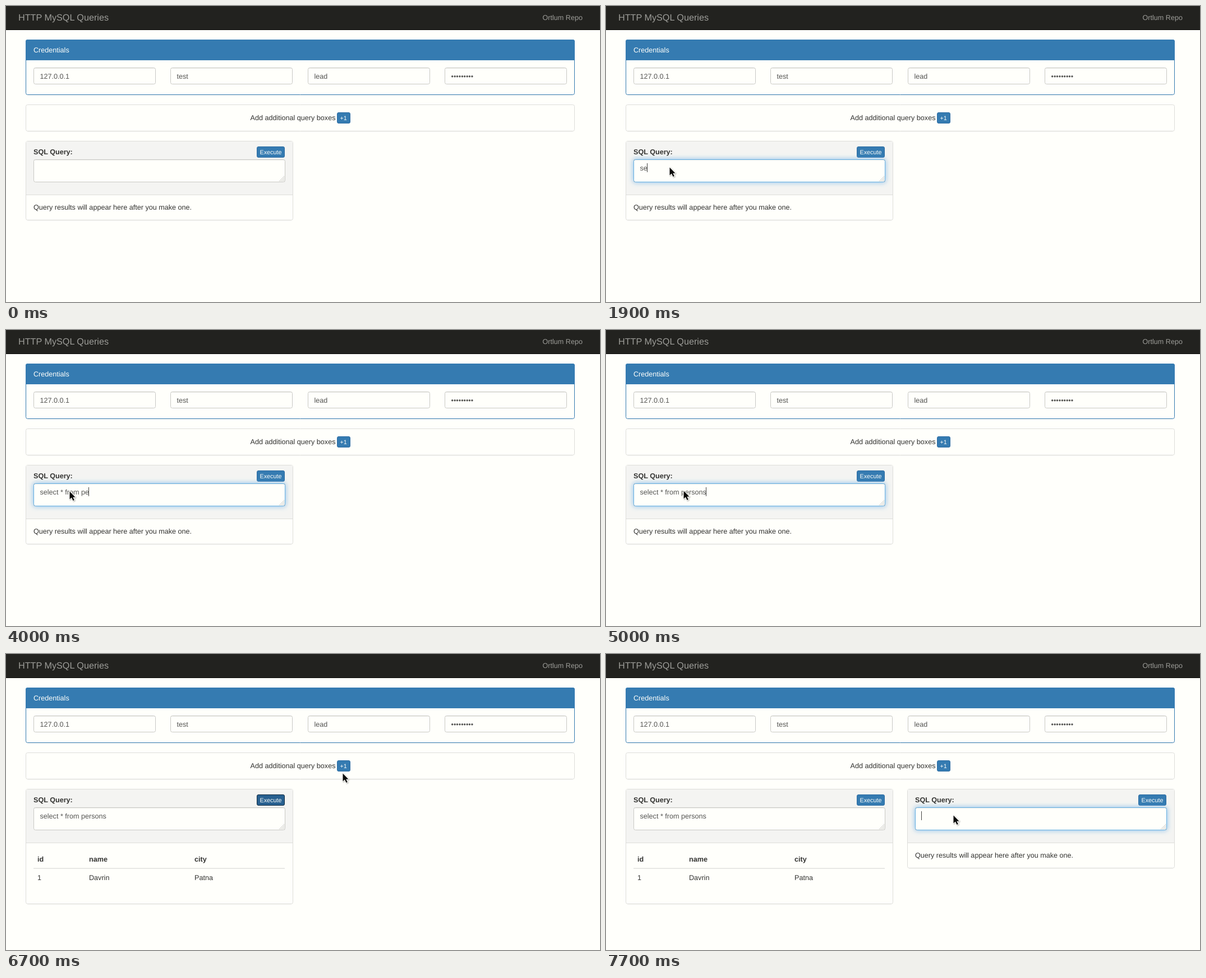
Write an HTML page with a canvas that moves like this. It is 1059 px wide and 529 px high and loops after 8000 ms.

```html
<!DOCTYPE html>
<html lang="en">
<head>
<meta charset="utf-8">
<title>HTTP MySQL Queries</title>
<style>
  html, body { margin: 0; width: 100%; height: 100%; overflow: hidden; background: #fffffb; }
  canvas { display: block; width: 1059px; height: 529px; }
</style>
</head>
<body>
<canvas id="stage" width="1059" height="529"></canvas>
<script>
const ctx = document.getElementById('stage').getContext('2d');
const LOOP = 8000, STEP = 100;
const PAGE = '#fffffb', INK = '#333331', FIELD_INK = '#555553', LINE = '#ddddda';
const BLUE = '#357bb1', BLUE_EDGE = '#2e6da4';
const QUERY = 'select * from persons';

// Time at which each character of the query is typed
const KEYS = [1800, 1900, 2000, 2100, 2300, 2400, 2500, 2700, 2900, 3100, 3300,
  3400, 3500, 3700, 3900, 4000, 4100, 4300, 4400, 4500, 4700];

// Pointer path: time, x, y
const PATH = [
  [100, 5, 330], [300, 60, 305], [500, 105, 290], [600, 113, 288],
  [4800, 113, 288], [5000, 138, 287], [5300, 420, 268], [5500, 474, 263],
  [6300, 474, 263], [6600, 576, 221], [6700, 600, 213], [6800, 602, 201],
  [7000, 602, 201], [7200, 619, 288]
];

const FOCUS = 600, SUBMIT = 5600, RESULT = 5700, ADD = 6900, FOCUS_NEXT = 7400;
const clamp = v => Math.max(0, Math.min(1, v));

function text(str, x, y, color = INK, size = 12.6, weight = 'normal') {
  ctx.font = `${weight} ${size}px "Liberation Sans", Arial, sans-serif`;
  ctx.textRendering = 'geometricPrecision';
  ctx.fillStyle = color;
  ctx.fillText(str, x, y);
}

function box(x, y, w, h, fill, stroke, r = 3) {
  ctx.beginPath();
  ctx.roundRect(x + 0.5, y + 0.5, w - 1, h - 1, r);
  ctx.fillStyle = fill;
  ctx.fill();
  ctx.strokeStyle = stroke;
  ctx.lineWidth = 1;
  ctx.stroke();
}

function rect(x, y, w, h, color) {
  ctx.fillStyle = color;
  ctx.fillRect(x, y, w, h);
}

function panel(x, y, w, h, edge = LINE) {
  rect(x + 3, y + h, w - 6, 1, 'rgba(0,0,0,.04)');
  box(x, y, w, h, PAGE, edge);
}

function field(x, y, w, h, glow = 0) {
  if (glow > 0) {
    ctx.save();
    ctx.shadowBlur = 8;
    ctx.shadowColor = `rgba(102,175,233,${0.75 * glow})`;
    box(x, y, w, h, PAGE, '#ccccc9');
    ctx.restore();
  }
  box(x, y, w, h, PAGE, '#c8c8c5');
  rect(x + 2, y + 1, w - 4, 1, 'rgba(0,0,0,.06)');
  if (glow > 0) {
    ctx.globalAlpha = glow;
    box(x, y, w, h, 'transparent', '#66afe0');
    ctx.globalAlpha = 1;
  }
}

function button(label, x, y, w, h, hover, focus) {
  const edge = hover ? '#204d74' : focus ? '#122b40' : BLUE_EDGE;
  box(x, y, w, h, hover || focus ? '#286090' : BLUE, edge, 2.5);
  text(label, x + 5.5, 265 + y - 251, '#fffffb', 10.8);
}

function grip(right, bottom) {
  for (let row = 0; row < 5; row++)
    for (let col = 0; col <= row; col++)
      rect(right - 3 - col * 2, bottom - 11 + row * 2, 1, 1, '#b4b4b0');
}

function queryPanel(x, state) {
  const { value, glow, caret, result, hover, focus } = state;
  const h = result ? 206 : 142;
  panel(x, 241, 477, h);
  rect(x + 1, 242, 475, 95, '#f4f4f2');
  rect(x + 1, 337, 475, 1, LINE);
  text('SQL Query:', x + 14, 265, INK, 12.6, 'bold');
  button('Execute', x + 412, 251, 50, 20, hover, focus);
  field(x + 14, 274, 449, 41, glow);
  grip(x + 463, 315);
  text(value, x + 25.5, 294, FIELD_INK);
  if (caret) {
    const end = Math.floor(x + 25.5 + ctx.measureText(value).width);
    rect(end, 281, 1, 16, '#444442');
  }
  if (!result) {
    text('Query results will appear here after you make one.', x + 14, 364);
    return;
  }
  const cols = [21, 113, 301];
  ['id', 'name', 'city'].forEach((s, i) => text(s, x + cols[i], 371, INK, 12.6, 'bold'));
  rect(x + 14, 382.5, 448, 1.3, LINE);
  ['1', 'Davrin', 'Patna'].forEach((s, i) => text(s, x + cols[i], 404));
}

function pointerAt(t) {
  if (t < PATH[0][0]) return null;
  const next = PATH.findIndex(p => p[0] > t);
  if (next < 0) return PATH[PATH.length - 1].slice(1);
  const [t0, x0, y0] = PATH[next - 1], [t1, x1, y1] = PATH[next];
  const k = (t - t0) / (t1 - t0);
  return [x0 + (x1 - x0) * k, y0 + (y1 - y0) * k];
}

function drawPointer([x, y]) {
  ctx.save();
  ctx.translate(Math.round(x) + 0.5, Math.round(y) + 0.5);
  const arrow = new Path2D('M0 0V14L3.4 11L6 16.6L8.3 15.5L5.8 10.2H10Z');
  ctx.shadowColor = 'rgba(0,0,0,.3)';
  ctx.shadowBlur = 2;
  ctx.shadowOffsetX = ctx.shadowOffsetY = 1;
  ctx.strokeStyle = '#fffffb';
  ctx.lineWidth = 2;
  ctx.lineJoin = 'round';
  ctx.stroke(arrow);
  ctx.shadowColor = 'transparent';
  ctx.fillStyle = '#0a0a09';
  ctx.fill(arrow);
  ctx.restore();
}

function inside(p, x, y, w, h) {
  return !!p && p[0] >= x && p[0] < x + w && p[1] >= y && p[1] < y + h;
}

function caretOn(t) {
  if (t < FOCUS || t >= SUBMIT) return false;
  const last = KEYS.filter(k => k <= t).pop() || FOCUS;
  return (t - last) % 1200 < 600;
}

function draw(t) {
  const mouse = pointerAt(t);
  rect(0, 0, 1059, 529, PAGE);

  rect(0, 0, 1059, 42, '#22221f');
  rect(0, 42, 1059, 1, '#080807');
  text('HTTP MySQL Queries', 22, 26, '#9d9d99', 16.2);
  text('Ortlum Repo', 956.5, 25, '#9d9d99');

  panel(35, 60, 979, 99, BLUE);
  ctx.beginPath();
  ctx.roundRect(35, 60, 979, 37, [3.5, 3.5, 0, 0]);
  ctx.fillStyle = BLUE;
  ctx.fill();
  text('Credentials', 49, 83, '#fffffb');
  ['127.0.0.1', 'test', 'lead', '•'.repeat(9)].forEach((s, i) => {
    const x = Math.round(49 + i * 244.4);
    field(x, 110, 218, 30);
    text(s, x + 11.5, 130, FIELD_INK);
  });

  panel(35, 176, 979, 48);
  text('Add additional query boxes', 435.5, 204);
  button('+1', 590, 190, 24, 20, inside(mouse, 590, 190, 24, 20),
    t >= ADD && t < FOCUS_NEXT);

  queryPanel(35, {
    value: QUERY.slice(0, KEYS.filter(k => k <= t).length),
    glow: clamp((t - FOCUS) / 150) * (1 - clamp((t - SUBMIT) / 170)),
    caret: caretOn(t),
    result: t >= RESULT,
    hover: inside(mouse, 447, 251, 50, 20),
    focus: t >= SUBMIT && t < ADD
  });
  if (t >= ADD) {
    queryPanel(537.5 | 0, {
      value: '',
      glow: clamp((t - FOCUS_NEXT) / 150),
      caret: t >= FOCUS_NEXT,
      result: false,
      hover: false,
      focus: false
    });
  }
  if (mouse) drawPointer(mouse);
}

function tick() {
  const t = performance.now() % LOOP;
  draw(Math.floor(t / STEP) * STEP);
  requestAnimationFrame(tick);
}
tick();
</script>
</body>
</html>
```
